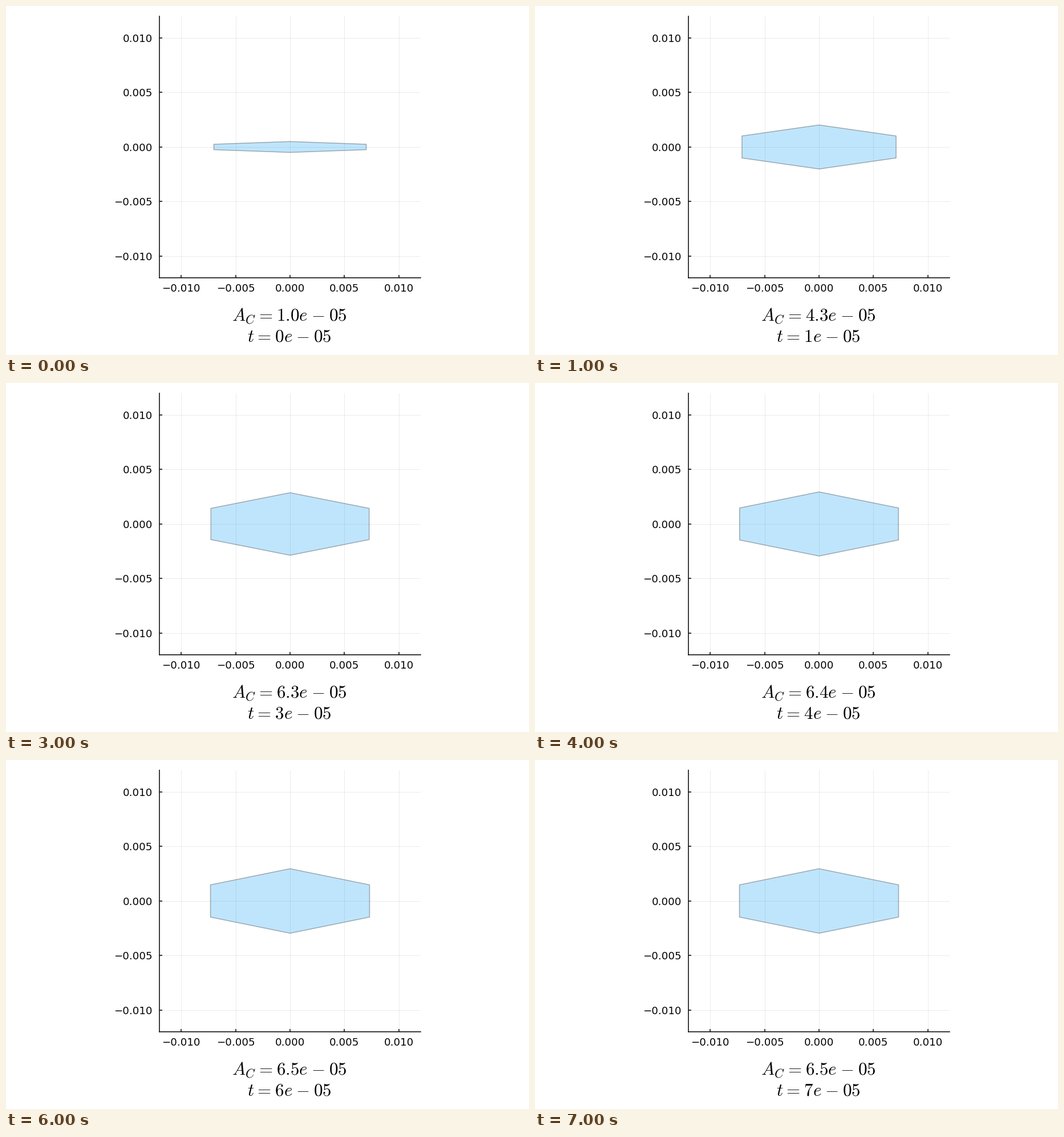
A matplotlib script for the animation above (8 s loop, 917x611 px).

```python
import numpy as np
import matplotlib.pyplot as plt
from matplotlib.animation import FuncAnimation
from matplotlib.patches import Polygon

W, H, DPI = 917, 611, 64
LIMIT = 0.012
BOX = (269, 17.8, 458, 458)  # left, top, width, height in pixels

# Half width and half height of the cross-section at each time step
HALF_W = [0.0070, 0.00708, 0.00721, 0.00727, 0.00730, 0.00731, 0.00731, 0.00731]
HALF_H = [0.000499, 0.00202, 0.002645, 0.00287, 0.00294, 0.00296, 0.00296, 0.00296]

plt.rcParams["font.family"] = "DejaVu Sans"
plt.rcParams["mathtext.fontset"] = "cm"


def px(size):
    """Convert pixels to points."""
    return size * 72 / DPI


def hexagon(w, h):
    return np.array([(0, h), (w, h / 2), (w, -h / 2),
                     (0, -h), (-w, -h / 2), (-w, h / 2)])


def formula(name, value):
    gap = r"\hspace{0.05}"
    return f"${name}{gap}={gap}{value}e{gap}-{gap}05$"


def caption(baseline):
    return fig.text(497.2 / W, 1 - baseline / H, "", fontsize=px(31),
                    ha="center", va="baseline")


fig = plt.figure(figsize=(W / DPI, H / DPI), dpi=DPI, facecolor="white")
left, top, width, height = BOX
ax = fig.add_axes([left / W, 1 - (top + height) / H, width / W, height / H])
ax.set_xlim(-LIMIT, LIMIT)
ax.set_ylim(-LIMIT, LIMIT)

ticks = np.arange(-2, 3) * 0.005
labels = [f"{v:.3f}".replace("-", "\u2212") for v in ticks]
ax.set_xticks(ticks, labels)
ax.set_yticks(ticks, labels)
ax.tick_params(direction="in", length=px(5), width=px(1.5), labelsize=px(18.3))
ax.tick_params(axis="x", pad=px(10.5))
ax.tick_params(axis="y", pad=px(12))
ax.grid(color="black", alpha=0.1, linewidth=px(0.76))
ax.set_axisbelow(True)
for side, spine in ax.spines.items():
    spine.set_visible(side in ("left", "bottom"))
    spine.set_linewidth(px(1.5))
    spine.set_snap(False)

shape = Polygon(hexagon(HALF_W[0], HALF_H[0]), closed=True,
                facecolor=(0, 154 / 255, 250 / 255, 0.25),
                edgecolor=(0, 0, 0, 0.3), linewidth=px(1.5), zorder=2)
ax.add_patch(shape)
area_text = caption(551.5)
time_text = caption(587)


def draw(step):
    w, h = HALF_W[step], HALF_H[step]
    shape.set_xy(hexagon(w, h))
    area_text.set_text(formula("A_C", f"{3 * w * h * 1e5:.1f}"))
    time_text.set_text(formula("t", step))
    return shape, area_text, time_text


anim = FuncAnimation(fig, draw, frames=len(HALF_W), interval=1000, repeat=True,
                     repeat_delay=0)
plt.show()
```
